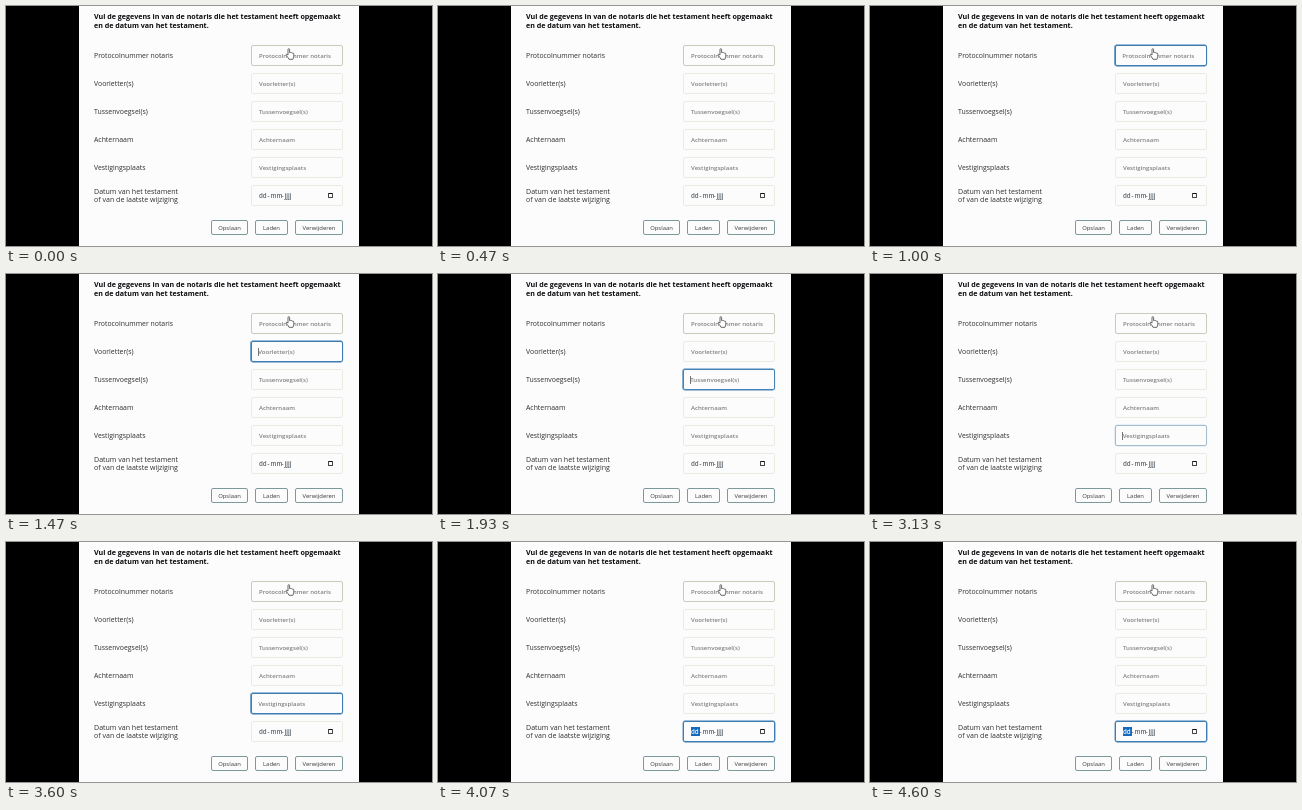
Write an HTML page that moves like this. It is 426 by 240 pixels and loops after 4.67 s.

```html
<!DOCTYPE html>
<html lang="nl">
<head>
<meta charset="utf-8">
<title>Testamentgegevens</title>
<style>
  html, body { margin: 0; width: 100%; height: 100%; overflow: hidden; background: #000; }
  body { position: relative; font: 6.9px/21px "Open Sans", "Noto Sans", sans-serif; color: #2e2e2e; }
  .page { position: absolute; left: 73px; top: 0; width: 280px; height: 240px; background: #fcfcfc; }
  h1 { position: absolute; left: 15px; top: 6px; margin: 0; font-size: 7.14px; line-height: 9px; color: #0c0c10; white-space: nowrap; }

  .row { position: absolute; left: 15px; top: calc(39px + 28px * var(--i)); width: 249px; height: 21px; white-space: nowrap; }
  .two { position: absolute; top: 2px; font-size: 7.05px; line-height: 8px; }
  .field { position: absolute; left: 157px; top: 0; width: 92px; height: 21px; box-sizing: border-box;
    border: 1px solid #ebebe3; border-radius: 2px; background: #fcfcfc; }
  .hover { border-color: #cbcbbb; }
  .hint { position: absolute; left: 7px; top: 0; font-size: 6.05px; font-weight: 600; line-height: 20px; color: #808080; }
  .ring { position: absolute; inset: -1px; border: 1px solid #3c7cb4; border-radius: 2px; }
  .caret { position: absolute; left: 6px; top: 6px; width: 1px; height: 8px; background: #777; }

  .ring, .caret, .mark { opacity: 0; }
  .ring, .caret, .mark, .hint { animation: 4670ms linear calc(510ms + 640ms * var(--i)) infinite; }
  .ring { animation-name: ring; }
  .caret { animation-name: caret; }
  .hint { animation-name: nudge; }
  .last .ring { animation-name: ring-last; }
  .mark { animation-name: mark; }

  @keyframes ring {
    0% { opacity: 0; box-shadow: 0 0 0 0 #3c7cb4; }
    3.2%, 13.7% { opacity: 1; box-shadow: -.3px 0 0 .4px #3c7cb4; }
    13.71%, 100% { opacity: 0; box-shadow: 0 0 0 0 #3c7cb4; }
  }
  @keyframes ring-last {
    0% { opacity: 0; box-shadow: 0 0 0 0 #3c7cb4; }
    3.2%, 20.55% { opacity: 1; box-shadow: 0 0 0 .4px #3c7cb4; }
    20.56%, 100% { opacity: 0; box-shadow: 0 0 0 0 #3c7cb4; }
  }
  @keyframes caret { 0%, 10.2% { opacity: 1; } 10.21%, 100% { opacity: 0; } }
  @keyframes mark { 0%, 20.55% { opacity: 1; } 20.56%, 100% { opacity: 0; } }
  @keyframes nudge {
    0% { transform: none; }
    3.2%, 13.7% { transform: translateX(-.8px); }
    13.71%, 100% { transform: none; }
  }

  .date span { position: absolute; top: 0; font-size: 6.2px; font-weight: 600; line-height: 20px; color: #56606a; }
  .date .mark { left: 7px; top: 5px; width: 9px; height: 9px; line-height: 10px; color: #fff; background: #1769bd; }
  .icon { position: absolute; left: 76px; top: 7px; width: 5px; height: 5px; box-sizing: border-box;
    border: 1px solid #444; border-top-color: #111; border-radius: 1px; }

  .button { position: absolute; top: 214px; height: 15px; box-sizing: border-box; border: 1px solid #7c9a9c;
    border-radius: 2px; background: #fcfcfc; font-size: 5.9px; line-height: 14px; text-align: center; color: #3a3a3a; }
  .hand { position: absolute; left: 279px; top: 42px; width: 10px; height: 12px; }
</style>
</head>
<body>
<div class="page">
  <h1>Vul de gegevens in van de notaris die het testament heeft opgemaakt<br>en de datum van het testament.</h1>

  <div class="row" style="--i:0">Protocolnummer notaris
    <div class="field hover"><span class="hint">Protocolnummer notaris</span><i class="caret"></i><i class="ring"></i></div>
  </div>
  <div class="row" style="--i:1">Voorletter(s)
    <div class="field"><span class="hint">Voorletter(s)</span><i class="caret"></i><i class="ring"></i></div>
  </div>
  <div class="row" style="--i:2">Tussenvoegsel(s)
    <div class="field"><span class="hint">Tussenvoegsel(s)</span><i class="caret"></i><i class="ring"></i></div>
  </div>
  <div class="row" style="--i:3">Achternaam
    <div class="field"><span class="hint">Achternaam</span><i class="caret"></i><i class="ring"></i></div>
  </div>
  <div class="row" style="--i:4">Vestigingsplaats
    <div class="field"><span class="hint">Vestigingsplaats</span><i class="caret"></i><i class="ring"></i></div>
  </div>
  <div class="row last" style="--i:5"><span class="two">Datum van het testament<br>of van de laatste wijziging</span>
    <div class="field date">
      <span style="left:7px">dd</span><span style="left:15.6px">-</span><span style="left:18.6px">mm</span>
      <span style="left:29.6px">-</span><span style="left:32.6px">jjjj</span>
      <span class="mark">dd</span><i class="icon"></i><i class="ring"></i>
    </div>
  </div>

  <div class="button" style="left:132px;width:37px">Opslaan</div>
  <div class="button" style="left:176px;width:33px">Laden</div>
  <div class="button" style="left:216px;width:48px">Verwijderen</div>
</div>

<svg class="hand" viewBox="0 0 10 12">
  <path d="M3 7V1.6Q3 .7 3.8 .7T4.6 1.6V4.6Q5.4 4 6 4.8Q6.8 4.3 7.4 5.1Q8.7 4.8 8.8 6.2V8.2Q8.6 9.6 7.9 11.3H4Q3.4 9.8 1.2 7.4Q.8 6.4 1.8 6.3Z"
    fill="#fff" stroke="#444" stroke-width=".8" stroke-linejoin="round"/>
</svg>
</body>
</html>
```
